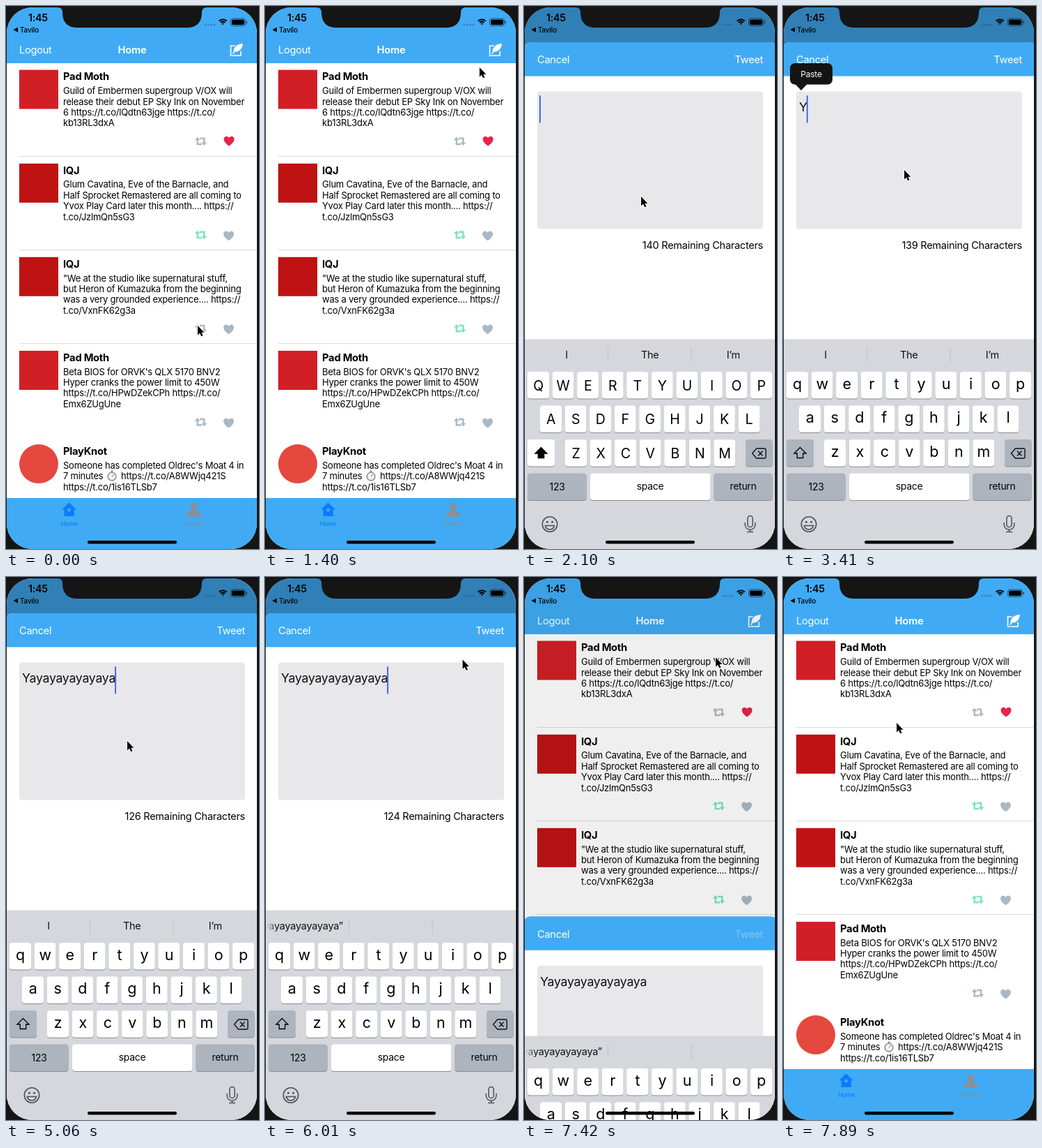
Write an HTML page with a canvas that moves like this. It is 363 by 778 pixels and loops after 8000 ms.

```html
<!DOCTYPE html>
<html lang="en">
<head>
<meta charset="utf-8">
<title>Timeline app</title>
<style>
  html, body { margin: 0; width: 100%; height: 100%; overflow: hidden; background: #151515; }
  canvas { display: block; width: 363px; height: 778px; }
</style>
</head>
<body>
<canvas id="stage"></canvas>
<script>
const LOOP = 8000, W = 363, H = 778, CELL = 134.15;
const BLUE = '#40abf4', GREY = '#aab8c4', RED = '#e6234a', GREEN = '#7ce3bb';
const BOARD = '#d5d7dd', DARK_KEY = '#aeb4be', BEZEL = '#151515';
const canvas = document.getElementById('stage');
const ctx = canvas.getContext('2d');
const ratio = window.devicePixelRatio || 1;
canvas.width = W * ratio;
canvas.height = H * ratio;

const posts = [
  { name: 'Pad Moth', logo: '#d21f26', liked: true, lines: [
    'Guild of Embermen supergroup V/OX will',
    'release their debut EP Sky Ink on November',
    '6 https://t.co/lQdtn63jge https://t.co/',
    'kb13RL3dxA'] },
  { name: 'IQJ', logo: '#bf1313', shared: 0, lines: [
    'Glum Cavatina, Eve of the Barnacle, and',
    'Half Sprocket Remastered are all coming to',
    'Yvox Play Card later this month.... https://',
    't.co/JzlmQn5sG3'] },
  { name: 'IQJ', logo: '#bf1313', shared: 230, lines: [
    '"We at the studio like supernatural stuff,',
    'but Heron of Kumazuka from the beginning',
    'was a very grounded experience.... https://',
    't.co/VxnFK62g3a'] },
  { name: 'Pad Moth', logo: '#d21f26', lines: [
    "Beta BIOS for ORVK's QLX 5170 BNV2",
    'Hyper cranks the power limit to 450W',
    'https://t.co/HPwDZekCPh https://t.co/',
    'Emx6ZUgUne'] },
  { name: 'PlayKnot', logo: '#e5483f', round: true, lines: [
    "Someone has completed Oldrec's Moat 4 in",
    '7 minutes',
    'https://t.co/1is16TLSb7'] }
];

// Pointer stops: time, x, y
const pointerStops = [
  [0, 275, 458], [110, 275, 458], [810, 321, 86], [1160, 327, 62], [1290, 327, 62],
  [1750, 196, 240], [2100, 168, 273], [2500, 174, 235], [5480, 174, 235],
  [6240, 314, 86], [6470, 316, 81], [7180, 316, 81], [7890, 163, 209], [LOOP, 163, 209]
];

const HEART = new Path2D('M0 7C-5 3.5-7.5.5-7.5-2.7C-7.5-5-5.8-6.7-3.7-6.7C-2.2-6.7-.8-5.8 0-4.4' +
  'C.8-5.8 2.2-6.7 3.7-6.7C5.8-6.7 7.5-5 7.5-2.7C7.5.5 5 3.5 0 7Z');
const SHARE_SHAFTS = new Path2D('M-4.8-3V4.2H1.5M4.8 3V-4.2H-1.5');
const SHARE_HEADS = new Path2D('M-8.8-1.6L-4.8-6.2L-.8-1.6ZM8.8 1.6L4.8 6.2L.8 1.6Z');
const FEATHER = new Path2D('M340 54C332 54 327 58 326.5 65L325 69H326.4L328 65.8C334 66 339 62 340 54Z');
const POINTER = new Path2D('M0 0V13.5L3 10.6L5.2 15.2L7.5 14.2L5.4 9.7H9.5Z');
const NOTCH = new Path2D('M74 0V2Q81 2 81 9Q81 31 103 31H259Q281 31 281 9Q281 2 288 2V0Z');

const clamp = v => Math.min(1, Math.max(0, v));
const easeOut = u => 1 - (1 - clamp(u)) ** 3;
const smooth = u => u * u * (3 - 2 * u);

// The sheet and its keys look slightly grey until they have settled
const isArriving = t => t < 2000;
const paper = t => isArriving(t) ? '#f1f1f4' : '#fff';

function box(x, y, w, h, r, color) {
  ctx.fillStyle = color;
  ctx.beginPath();
  ctx.roundRect(x, y, w, h, r);
  ctx.fill();
}

function setFont(size, weight = 400) {
  ctx.font = `${weight} ${size}px Inter, Roboto, sans-serif`;
  ctx.letterSpacing = `${-0.018 * size}px`;
}

// y is the middle of the capital letters
function text(str, x, y, size, color = '#000', weight = 400, align = 'left') {
  setFont(size, weight);
  ctx.fillStyle = color;
  ctx.textAlign = align;
  ctx.fillText(str, x, y + size * 0.364);
}

function fillPath(d, color) {
  ctx.fillStyle = color;
  ctx.fill(typeof d === 'string' ? new Path2D(d) : d);
}

function strokePath(d, color, width) {
  ctx.strokeStyle = color;
  ctx.lineWidth = width;
  ctx.stroke(typeof d === 'string' ? new Path2D(d) : d);
}

function dot(x, y, r, color) {
  ctx.fillStyle = color;
  ctx.beginPath();
  ctx.arc(x, y, r, 0, 7);
  ctx.fill();
}

function at(x, y, draw) {
  ctx.save();
  ctx.translate(x, y);
  draw();
  ctx.restore();
}

function drawStopwatch() {
  box(-1.5, -8, 3, 3, 1, '#8d9296');
  dot(0, 0.5, 6.6, '#8d9296');
  dot(0, 0.5, 5, '#f3f3f1');
  strokePath('M0 .5L2.6-2.4', '#e08a2c', 1.2);
}

function drawPost(post, t) {
  if (post.round) dot(47, 119.5, 28, post.logo);
  else box(19, 91.5, 56, 56, 0, post.logo);
  text(post.name, 82, 101, 14.74, '#000', 700);
  post.lines.forEach((line, i) => text(line, 82, 121.5 + i * 15.4, 13));
  if (post.round) {
    at(152, 137, drawStopwatch);
    text('https://t.co/A8WWjq421S', 165, 136.9, 13);
    return;
  }
  at(279.5, 193.8, () => {
    const color = t >= post.shared ? GREEN : GREY;
    strokePath(SHARE_SHAFTS, color, 2.4);
    fillPath(SHARE_HEADS, color);
  });
  if (post.liked) at(320, 193.5, () => fillPath(HEART, RED));
  else at(319.5, 195, () => fillPath(HEART, GREY));
}

function drawHome(t) {
  box(0, 0, W, H, 0, '#fff');
  posts.forEach((post, i) => at(0, i * CELL, () => drawPost(post, t)));
  for (let i = 0; i < 3; i++) box(19, Math.round(215 + i * CELL), 341, 1, 0, '#dcdcde');

  box(0, 0, W, 82, 0, BLUE);
  text('Logout', 19, 63, 14.6, '#fff');
  text('Home', 181, 63, 14.74, '#fff', 600, 'center');
  const compose = t > 1000 && t < 1150 ? '#8ccdf9' : '#fff';
  strokePath('M330 57H322.5V71H337V64.5', compose, 1.6);
  strokePath(FEATHER, BLUE, 2.4);
  fillPath(FEATHER, compose);

  box(0, 705, W, 73, 0, BLUE);
  fillPath('M90.5 711.5L101 721.5H97.8V731H83.5V721.5H80.3Z', '#0a7cff');
  dot(90.6, 722, 2.5, BLUE);
  text('Home', 91, 742, 8.7, '#0a7cff', 500, 'center');
  dot(269.5, 717.5, 5.2, '#8b8f98');
  fillPath('M259.5 731.5V728Q261 724.5 266 723.5H273Q278 724.5 279.5 728V731.5Z', '#8b8f98');
  text('Profile', 270, 742, 8.7, '#7892a8', 500, 'center');
}

function drawKey(x, y, w, color) {
  box(x, y + 1, w, 38.5, 4, '#898c92');
  box(x, y, w, 38.5, 4, color);
}

function drawKeyboard(t, shifted) {
  const keyColor = paper(t);
  box(0, 477.5, W, 400, 0, BOARD);
  if (t < 5600) {
    ['I', 'The', 'I’m'].forEach((word, i) => text(word, 61 + i * 119.7, 500, 14.5, '#111', 400, 'center'));
  } else {
    text('“Yayayayayayayaya”', 112, 500, 14.5, '#111', 400, 'right');
    const fade = ctx.createLinearGradient(1, 0, 18, 0);
    fade.addColorStop(0, BOARD);
    fade.addColorStop(1, 'rgba(213,215,221,0)');
    box(0, 488, 18, 26, 0, fade);
  }
  box(120, 489, 1, 22, 0, '#bfc2c8');
  box(239.5, 489, 1, 22, 0, '#bfc2c8');

  [['qwertyuiop', 5], ['asdfghjkl', 23], ['zxcvbnm', 59]].forEach(([letters, left], row) => {
    [...letters].forEach((letter, i) => {
      const x = left + i * 35.55, y = 524 + row * 48.6;
      drawKey(x, y, 31, keyColor);
      if (shifted) text(letter.toUpperCase(), x + 15.5, y + 19.5, 19.5, '#000', 400, 'center');
      else text(letter, x + 15.5, y + 17, 21.5, '#000', 400, 'center');
    });
  });

  drawKey(5, 621, 39, shifted ? keyColor : DARK_KEY);
  const arrow = 'M24.5 632.5L33 641H28.7V647.5H20.3V641H16Z';
  if (shifted) fillPath(arrow, '#000');
  strokePath(arrow, '#000', 1.3);
  drawKey(318, 621, 38.5, DARK_KEY);
  strokePath('M333.5 634H345Q347 634 347 636V646Q347 648 345 648H333.5L327.5 641Z' +
    'M336 637.5L342.5 644.5M342.5 637.5L336 644.5', '#111', 1.4);

  drawKey(5, 669.5, 84.5, DARK_KEY);
  drawKey(95, 669.5, 172.5, keyColor);
  drawKey(272.5, 669.5, 84, DARK_KEY);
  text('123', 47.5, 689, 13.9, '#000', 400, 'center');
  text('space', 181, 688, 13.9, '#000', 400, 'center');
  text('return', 314.5, 688, 13.9, '#000', 400, 'center');

  at(37, 742.5, () => {
    strokePath('M-10.7 0A10.7 10.7 0 1 1 10.7 0A10.7 10.7 0 1 1-10.7 0ZM-6.5 2H6.5Q5.5 7.5 0 7.5Q-5.5 7.5-6.5 2Z',
      '#4d5157', 1.6);
    dot(-3.6, -3.2, 1.5, '#4d5157');
    dot(3.6, -3.2, 1.5, '#4d5157');
  });
  at(324.5, 742, () => strokePath('M-3.6-8A3.6 3.6 0 0 1 3.6-8V1A3.6 3.6 0 0 1-3.6 1Z' +
    'M-7.3-2V1A7.3 7.3 0 0 0 7.3 1V-2M0 8.3V11.5M-4.5 11.5H4.5', '#4d5157', 1.5));
}

function caretAlpha(t) {
  const start = t < 3400 ? 2180 : 5490;
  if (t < start || (t >= 3400 && t < 5490)) return 1;
  const phase = (t - start) % 820;
  return phase < 380 ? 1 - clamp(phase / 100) : clamp((phase - 380) / 100);
}

function drawSheet(t, typed) {
  box(0, 52, W, 900, 9, paper(t));
  box(0, 52, W, 48.5, [9, 9, 0, 0], BLUE);
  text('Cancel', 19, 77, 14.6, '#fff');
  text('Tweet', 343, 77, 14.6, t > 6700 ? 'rgba(255,255,255,.35)' : '#fff', 400, 'right');
  if (!isArriving(t)) box(19, 122.5, 324, 197, 4, '#e8e8ea');
  const message = 'Y' + 'ay'.repeat(8).slice(0, Math.max(0, typed - 1));
  let width = 0;
  if (typed) {
    text(message, 23, 145, 17.8, '#111');
    width = ctx.measureText(message).width;
  }
  ctx.globalAlpha = caretAlpha(t);
  box(22 + width, 128, 2, 39.5, 1, '#4268e4');
  ctx.globalAlpha = 1;
  text(`${140 - typed} Remaining Characters`, 343, 342.5, 14.5, '#000', 400, 'right');
}

function drawPasteMenu(t) {
  ctx.globalAlpha = clamp((t - 2580) / 150) * (1 - clamp((t - 3430) / 150));
  box(10, 82, 61, 30.5, 7, '#141414');
  fillPath('M17.5 112L26 121L34.5 112Z', '#141414');
  text('Paste', 40.5, 97.5, 12, '#fff', 400, 'center');
  ctx.globalAlpha = 1;
}

function drawStatus() {
  text('1:45', 32, 17.2, 14.3, '#000', 600);
  fillPath('M10.5 34L17 30.5V37.5Z', '#000');
  text('Tavilo', 20, 34, 10, '#000', 500);
  for (let i = 0; i < 4; i++) dot(286 + i * 4.3, 27, 1.4, 'rgba(20,70,115,.4)');
  ctx.strokeStyle = '#000';
  ctx.lineWidth = 2.1;
  for (const r of [1.4, 4.6, 7.8]) {
    ctx.beginPath();
    ctx.arc(311.2, 27, r, -Math.PI * 0.75, -Math.PI * 0.25);
    ctx.stroke();
  }
  ctx.lineWidth = 1;
  ctx.strokeStyle = 'rgba(0,0,0,.55)';
  ctx.beginPath();
  ctx.roundRect(322.5, 18, 21, 10.5, 3);
  ctx.stroke();
  box(324, 19.5, 18, 7.5, 1.8, '#000');
  box(344.5, 21.5, 1.4, 3.5, 0.7, 'rgba(0,0,0,.6)');
}

function drawPointer(t) {
  const i = pointerStops.findIndex(stop => stop[0] > t);
  const [t0, x0, y0] = pointerStops[i - 1], [t1, x1, y1] = pointerStops[i];
  const u = smooth((t - t0) / (t1 - t0));
  at(x0 + (x1 - x0) * u, y0 + (y1 - y0) * u, () => {
    ctx.lineJoin = 'round';
    strokePath(POINTER, '#fff', 2);
    fillPath(POINTER, '#000');
  });
}

function draw(t) {
  ctx.setTransform(ratio, 0, 0, ratio, 0, 0);
  box(0, 0, W, H, 0, BEZEL);
  ctx.save();
  ctx.beginPath();
  ctx.roundRect(1, 2, 359, 776, 37);
  ctx.clip();

  drawHome(t);
  const shown = easeOut((t - 1585) / 500) - easeOut((t - 7290) / 500);
  if (shown > 0) {
    const typed = t < 3400 ? 0 : Math.min(16, Math.max(1, Math.floor((t - 3400) / 118)));
    box(0, 0, W, H, 0, `rgba(0,0,0,${0.25 * shown ** 1.5})`);
    at(0, 726 * (1 - shown), () => drawSheet(t, typed));
    at(0, 301 * (1 - shown), () => drawKeyboard(t, typed === 0));
    drawPasteMenu(t);
  }
  drawStatus();
  box(117, 766, 128, 4.6, 2.3, '#000');
  ctx.restore();
  fillPath(NOTCH, BEZEL);
  drawPointer(t);
}

const begin = performance.now();
function tick() {
  draw((performance.now() - begin) % LOOP);
  requestAnimationFrame(tick);
}
tick();
</script>
</body>
</html>
```
